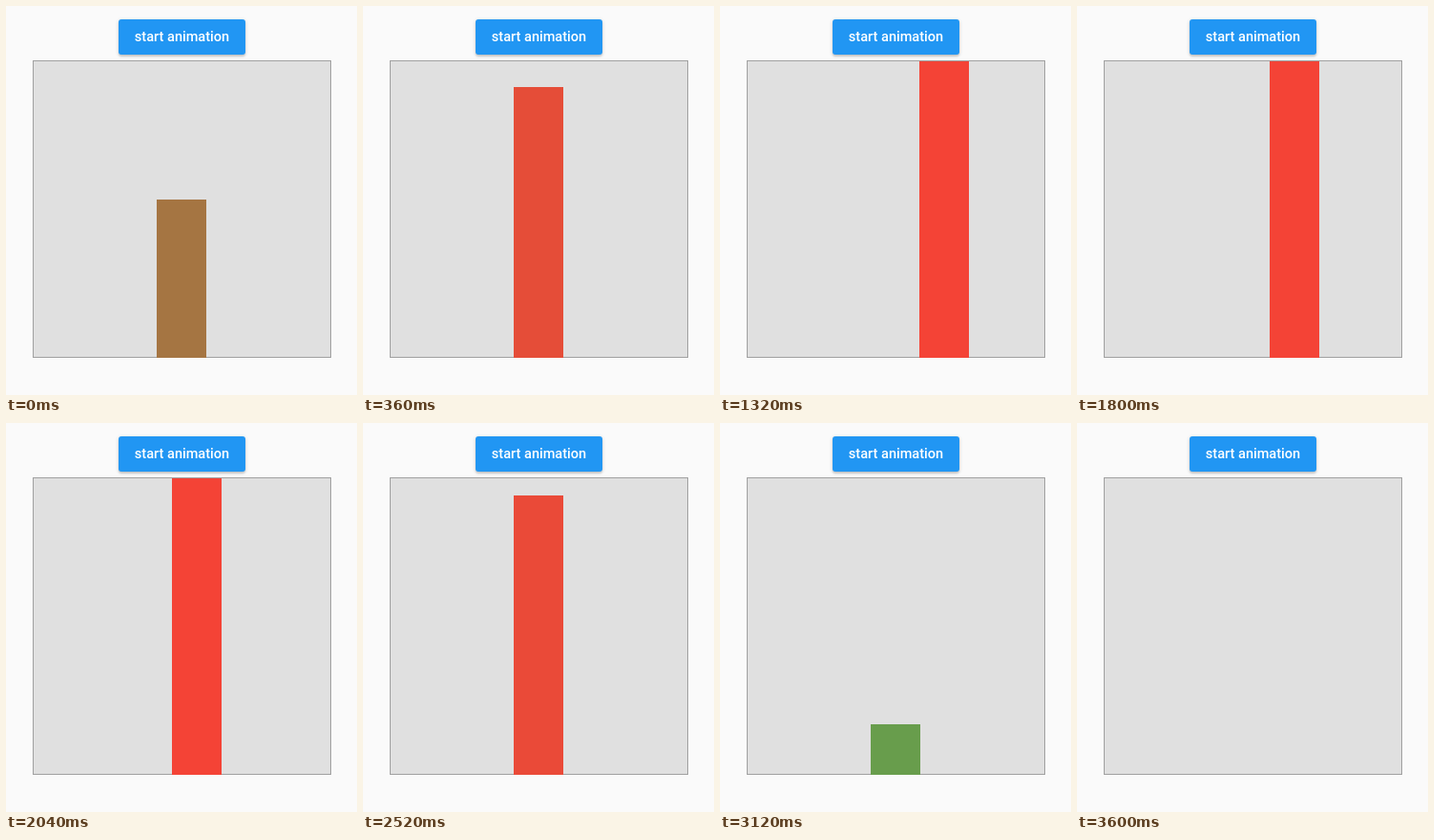
An HTML page that plays this animation: 368 px wide and 408 px high, repeating every 3.72 s.

```html
<!DOCTYPE html>
<html lang="en">
<head>
<meta charset="utf-8">
<style>
  html, body { margin: 0; width: 100%; height: 100%; overflow: hidden; background: #fafafa; }
  div { position: absolute; box-sizing: border-box; }
  #button {
    left: 118px; top: 14px; width: 133px; height: 37px; border-radius: 3px;
    background: #2196f3; color: #fff; text-align: center; white-space: nowrap;
    font: 500 14.56px/37px Roboto, sans-serif;
    box-shadow: 0 2px 2px rgba(0,0,0,.14), 0 1px 4px rgba(0,0,0,.14);
  }
  #box { left: 28px; top: 57px; width: 313px; height: 312px; background: #e0e0e0; border: 1px solid #a0a0a0; }
  #bar { bottom: -1px; width: 52px; }
</style>
</head>
<body>
<div id="button">start animation</div>
<div id="box"><div id="bar"></div></div>
<script>
const LOOP = 3720, STEP = 120, HALF = 2000;
const GREEN = [76, 175, 80], RED = [244, 67, 54];
const bar = document.getElementById('bar');
const clamp = v => Math.min(1, Math.max(0, v));

// cubic-bezier(.25, .1, .25, 1), solved by bisection
function ease(x) {
  if (x <= 0 || x >= 1) return clamp(x);
  let lo = 0, hi = 1, s;
  for (let i = 0; i < 24; i++) {
    s = (lo + hi) / 2;
    if (.75 * s * (1 - s) + s ** 3 < x) lo = s; else hi = s;
  }
  return .3 * s * (1 - s) ** 2 + 3 * s * s * (1 - s) + s ** 3;
}

function draw() {
  const step = Math.floor(performance.now() % LOOP / STEP);
  const time = 372 + step * 133;
  // runs forward for HALF ms, then backward
  const p = clamp(1 - Math.abs(time - HALF) / HALF);
  const grow = ease(p / .6), slide = ease((p - .6) / .4);
  bar.style.height = Math.min(311, 312 * grow) + 'px';
  bar.style.left = 129 + 52 * slide + 'px';
  bar.style.background = `rgb(${GREEN.map((c, i) => Math.round(c + (RED[i] - c) * grow))})`;
  requestAnimationFrame(draw);
}
draw();
</script>
</body>
</html>
```
